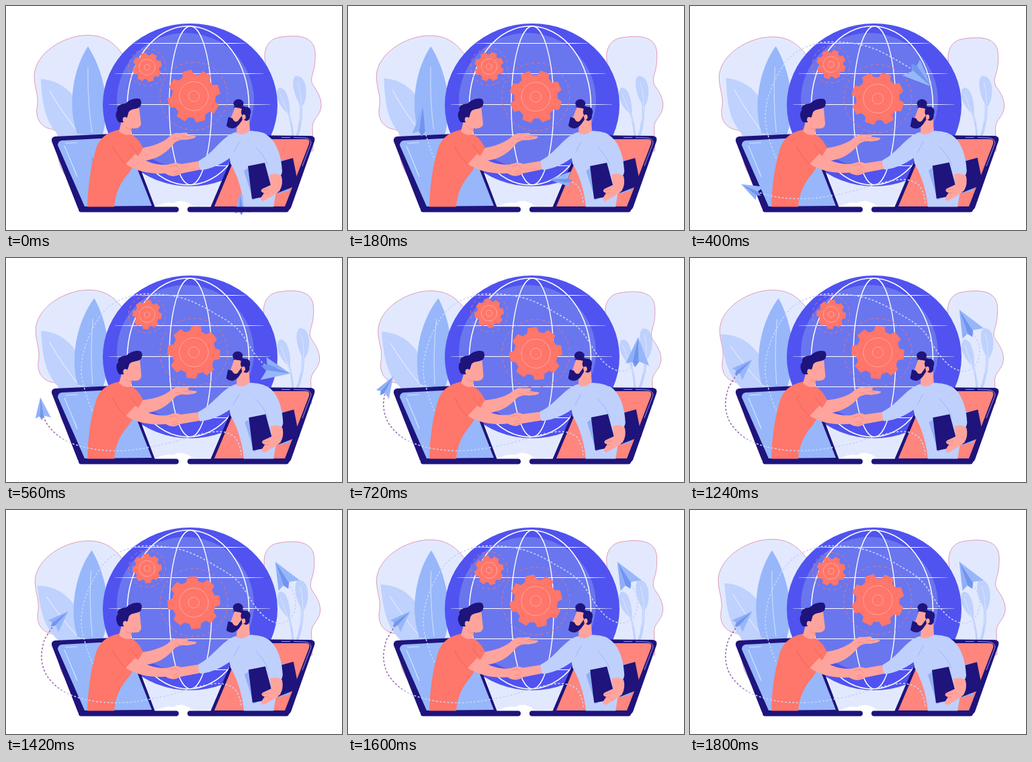
Animation, 500 px wide and 333 px high, one loop 1820 ms. Source, as an HTML page with a canvas:

```html
<!DOCTYPE html>
<html lang="en">
<head>
<meta charset="utf-8">
<title>Online agreement</title>
<style>
html, body { margin: 0; width: 100%; height: 100%; overflow: hidden; background: #fff; }
canvas { display: block; width: 500px; height: 333px; }
</style>
</head>
<body>
<canvas id="stage" width="500" height="333"></canvas>
<script>
const ctx = document.getElementById('stage').getContext('2d');
const LOOP = 1820, TAU = Math.PI * 2, DEG = Math.PI / 180;
const C = {
  navy: '#1e147c', coral: '#ff766a', crease: '#e9635d', skin: '#ffa49d', skinLine: '#f0837c',
  screen: '#97b7fa', warm: '#ff857d', shirt: '#bfd0fc', fold: '#91aff5', mist: '#e2e9fe',
  leaf: '#97b7fa', pale: '#bfd1fd', globe: '#5053ef', glow: '#6a76ee', trail: '#c5d3fc'
};

function fill(d, color) {
  ctx.fillStyle = color;
  ctx.fill(new Path2D(d));
}
function line(d, color, width = 1) {
  ctx.strokeStyle = color;
  ctx.lineWidth = width;
  ctx.stroke(new Path2D(d));
}
function oval(x, y, rx, ry, color) {
  ctx.beginPath();
  ctx.ellipse(x, y, rx, ry, 0, 0, TAU);
  ctx.fillStyle = color;
  ctx.fill();
}
function ring(x, y, rx, ry, color, width) {
  ctx.beginPath();
  ctx.ellipse(x, y, rx, ry, 0, 0, TAU);
  ctx.strokeStyle = color;
  ctx.lineWidth = width;
  ctx.stroke();
}
function turned(x, y, degrees, draw) {
  ctx.save();
  ctx.translate(x, y);
  ctx.rotate(degrees * DEG);
  ctx.translate(-x, -y);
  draw();
  ctx.restore();
}

// Smooth curve through a few points, sampled with its running length
function route(points) {
  const out = [];
  const at = i => points[Math.max(0, Math.min(points.length - 1, i))];
  let length = 0;
  for (let i = 0; i < points.length - 1; i++) {
    const [a, b, c, d] = [at(i - 1), at(i), at(i + 1), at(i + 2)];
    for (let k = i ? 1 : 0; k <= 16; k++) {
      const t = k / 16;
      const [x, y] = [0, 1].map(n => 0.5 * (2 * b[n] + (c[n] - a[n]) * t +
        (2 * a[n] - 5 * b[n] + 4 * c[n] - d[n]) * t * t +
        (3 * b[n] - a[n] - 3 * c[n] + d[n]) * t * t * t));
      const last = out[out.length - 1];
      if (last) length += Math.hypot(x - last.x, y - last.y);
      out.push({ x, y, length });
    }
  }
  return { points: out, length };
}
function along(path, dist) {
  const p = path.points;
  let i = 1;
  while (i < p.length - 1 && p[i].length < dist) i++;
  const a = p[i - 1], b = p[i], f = (dist - a.length) / (b.length - a.length || 1);
  return { x: a.x + (b.x - a.x) * f, y: a.y + (b.y - a.y) * f, angle: Math.atan2(b.y - a.y, b.x - a.x) };
}

const lowRoute = route([[350, 293], [348, 281], [339, 265], [318, 258], [285, 263], [235, 277], [180, 286],
  [130, 284], [88, 271], [62, 248], [53, 222], [56, 197], [62, 185], [70, 173], [81, 162]]);
const highRoute = route([[135, 242], [120, 205], [112, 165], [122, 120], [149, 76], [188, 56], [230, 54],
  [270, 62], [310, 82], [345, 106], [372, 145], [391, 163], [411, 168], [427, 156], [431, 136], [427, 121], [419, 109], [411, 95]]);

// Flight progress: time, share of route, slope per ms
const flight = [[0, 0, 0], [180, .13, .0019], [400, .68, .0013], [720, .915, .0004], [1040, .99, .0001], [1300, 1, 0]];
function progress(t) {
  for (let i = 1; i < flight.length; i++) {
    const [t0, p0, m0] = flight[i - 1], [t1, p1, m1] = flight[i];
    if (t > t1) continue;
    const w = t1 - t0, u = (t - t0) / w, v = 1 - u;
    return v * v * (1 + 2 * u) * p0 + u * v * v * w * m0 + u * u * (3 - 2 * u) * p1 - u * u * v * w * m1;
  }
  return 1;
}

function plane(path, t, sx, sy, color) {
  const dist = progress(t) * path.length, pos = along(path, dist);
  ctx.beginPath();
  for (const p of path.points) {
    if (p.length > dist - 12) break;
    ctx.lineTo(p.x, p.y);
  }
  ctx.strokeStyle = color;
  ctx.lineWidth = 1.6;
  ctx.setLineDash([3, 2.6]);
  ctx.stroke();
  ctx.setLineDash([]);
  ctx.save();
  ctx.translate(pos.x, pos.y);
  ctx.rotate(pos.angle);
  ctx.scale(sx, sy);
  fill('M21 0L-16 -7L-24 -3L-14 4Z', '#7195ee');
  fill('M21 0L-19 -17L-16 -7Z', '#8eaff8');
  fill('M21 0L-15 2L-21 18Z', '#98b7fa');
  ctx.restore();
}

function gear(x, y, r, turn) {
  ctx.setLineDash([4.5, 4]);
  ctx.lineDashOffset = -turn * r * 1.3;
  ring(x, y, r * 1.31, r * 1.31, '#e7757f', 1);
  ctx.setLineDash([]);
  ctx.save();
  ctx.translate(x, y);
  ctx.rotate(turn);
  ctx.beginPath();
  for (let i = 0; i < 8; i++) {
    for (const [a, k] of [[-.25, .82], [-.16, 1], [.16, 1], [.25, .82]]) {
      const q = i * TAU / 8 + a;
      ctx.lineTo(Math.sin(q) * r * k, -Math.cos(q) * r * k);
    }
  }
  ctx.closePath();
  ctx.fillStyle = ctx.strokeStyle = C.coral;
  ctx.lineWidth = 2;
  ctx.lineJoin = 'round';
  ctx.fill();
  ctx.stroke();
  ctx.restore();
  ring(x, y, r * .56, r * .56, '#ffaca4', .9);
  ring(x, y, r * .21, r * .21, '#ffaca4', .9);
}

function clouds(s) {
  ctx.save();
  ctx.translate(235, 300);
  ctx.scale(1 - .016 * s, 1 - .023 * s);
  ctx.translate(-235, -300);
  for (const d of [
    'M180 82C163 53 145 43 120 43.5C86 44 43 70 42 104C42 122 50 134 46 152C44 170 54 181 68 183C82 186 76 200 77 217C78 240 88 258 112 272L200 250Z',
    'M386 84C382 65 390 50 405 47C420 44 440 43 450 50C461 57 461 70 459.5 86C458 101 451 108 457 118C465 129 470 139 469 150C467 164 456 168 456 180L457 215L390 230L380 120Z'
  ]) {
    fill(d, C.mist);
    line(d, '#df8fb0', .9);
  }
  fill('M200 230L340 230L325 300C305 293 292 300 278 297C267 288 256 288 249 293C238 290 228 296 218 299Z', C.mist);
  ctx.restore();
}

function leaves(t, s) {
  turned(115, 195, 2.8 * Math.cos((t - 300) / LOOP * TAU) - 1, () => {
    fill('M51 109C90 111 115 141 124 196L84 198C58 175 54 150 51 109Z', C.pale);
    line('M64 126Q84 160 110 191', '#e2eaff', 1.2);
  });
  turned(130, 200, 5.7 * s, () => {
    fill('M122 60C101 91 90 146 106 190L143 194C157 148 145 96 122 60Z', C.leaf);
    line('M122 91Q121 142 128 188', '#c8d8fe', 1.3);
  });
  turned(428, 198, 1.2 * s, () => {
    line('M413 145Q426 166 427 198', C.pale, 3);
    fill('M406 122C398 130 406 151 422 162C424 147 418 118 406 122Z', C.pale);
    line('M408 131L424 172', '#dce6ff', .9);
  });
  turned(430, 198, 5.5 * s, () => {
    line('M438 138Q442 168 432 198', C.pale, 4);
    fill('M431 104C423 110 428 134 440 150C450 140 450 102 431 104Z', C.pale);
    line('M434 113Q443 138 437 172', '#dce6ff', .9);
  });
}

function globe() {
  oval(274, 147, 130, 121, C.globe);
  oval(267, 140, 102, 100, C.glow);
  ring(271, 148, 90.5, 118, '#fff', 1.5);
  ring(274.5, 148, 31.5, 118, '#fff', 1.4);
  for (const [y, a, b] of [[55.5, 190, 357], [100.5, 162, 383], [146.5, 153, 393], [191.5, 163, 383], [237.5, 190, 357]]) {
    const g = ctx.createLinearGradient(a, 0, b, 0);
    g.addColorStop(0, '#ffffff55');
    g.addColorStop(.12, '#fff');
    g.addColorStop(.88, '#fff');
    g.addColorStop(1, '#ffffff55');
    line(`M${a} ${y}H${b}`, g, 1.2);
  }
}

function leftScreen() {
  fill('M73 194L180 189L222 300L112 305Q108 304 106 298L68 201Q67 195 73 194Z', C.navy);
  fill('M83 200L177 195L217 297L117 298L77 207Q77 201 83 200Z', C.screen);
  line('M88 204L106 203M87 208L105 251M101 242L106 254', '#d4e1ff', 1.2);
}
function rightScreen() {
  fill('M350 192L454 193Q461 194 459 201L424 300Q421 305 416 305L304 300Z', C.navy);
  fill('M352 198L446 198Q453 198 451 205L415 298L310 298Z', C.warm);
  line('M410 195.5L423 195.5M428 195.5L444 196Q454 197 454 204L441 238', '#a79de0', .9);
}
function base(x0, x1) {
  ctx.beginPath();
  ctx.roundRect(x0, 298.5, x1 - x0, 8, 4);
  ctx.fillStyle = C.navy;
  ctx.fill();
}

function leftMan(s) {
  turned(197, 222, 5 * s, () => {
    fill('M188 212C210 212 229 205 240 197C247 190 251 188 258 189L269 188Q272 190 268 192L282 193Q284 195 278 197L268 199C260 198 256 200 251 203C242 215 230 225 212 229L190 233Z', C.skin);
    line('M262 194L275 194.5M250 197Q255 196 260 198', C.skinLine, .7);
  });
  fill('M168 184C151 187 139 196 134 212C125 241 122 270 121 300L161 300C162 281 168 267 178 254Q187 244 190 235L204 211C199 201 194 195 187 191Z', C.coral);
  turned(180, 228, -3 * s, () => {
    fill('M191 219C206 231 222 237 240 236L252 233Q263 235 262 243Q259 249 250 253Q243 253 237 249C214 250 194 246 177 234Z', C.skin);
  });
  fill('M160 205C165 193 187 195 204 211L193 219L178 235Q166 225 160 205Z', C.coral);
  line('M159 208Q165 224 178 235M186 206Q190 214 195 218', C.crease, .9);
  turned(178, 190, 2.5 * s, () => {
    fill('M172 171L168 186Q176 194 186 191L187 179Z', C.skin);
    fill('M174 168C177 155 188 150 198 150L201 175Q200 183 188 182C180 181 176 176 174 168Z', C.skin);
    line('M178 180Q182 184 187 183', C.skinLine, .8);
    fill('M168 173C163 167 162 159 166 155C163 149 172 145 178 145C183 139 193 136 199 138Q203 142 200 149C196 154 187 152 183 157C181 160 182 164 179 167Q172 164 175 173Z', C.navy);
    oval(177, 169, 3.3, 4, C.skin);
  });
}

function rightMan(s) {
  fill('M335 191C345 184 373 184 386 190C400 201 410 220 411 246Q411 260 403 270L398 300L354 300C353 278 344 250 334 234L330 208Z', C.shirt);
  line('M371 209Q384 222 390 237M347 202L336 222', C.fold, .8);
  turned(335, 207, 2.5 * s, () => {
    fill('M290 230L261 235Q251 231 244 237Q239 241 246 245L247 251Q251 255 261 249L290 243Z', C.skin);
    line('M244 239L253 237L259 243M248 247L256 245M249 251L258 248', C.skinLine, .8);
    fill('M341 188C322 193 309 219 287 230Q286 238 290 244C308 242 325 233 338 222Z', C.shirt);
  });
  turned(352, 188, -2.5 * s, () => {
    fill('M344 174L343 189Q353 194 363 185L362 167L351 168Z', C.skin);
    fill('M341 150L354 152L353 168L346 178L334 168Z', C.skin);
    oval(346, 145, 7.5, 6.5, C.navy);
    fill('M338 151C342 147 351 147 356 150C364 149 366 157 363 162C364 169 358 174 353 168L353 164Q348 160 351 153Q345 150 338 151Z', C.navy);
    fill('M331 165L337 167Q340 174 345 171L351 163Q354 168 349 173Q345 180 338 182Q331 182 328 178Z', C.navy);
    oval(354, 165, 2.7, 3.8, C.skin);
  });
  ctx.save();
  ctx.translate(2 * s, -s);
  fill('M354 245L363 239L378 282L368 289Z', C.fold);
  fill('M407 232L412 228L421 275L402 279Z', C.fold);
  fill('M360 238L385 233L398 281L366 287Z', C.navy);
  fill('M409 231L427 226L435 266L404 278Z', C.navy);
  fill('M386 191C401 198 410 220 411 246Q410 255 402 257L391 250Q391 231 382 215Z', C.shirt);
  fill('M392 251Q402 247 410 253Q413 265 407 275L394 284L383 290Q377 289 380 284L384 278Q377 276 381 272L394 266Z', C.skin);
  line('M381 274L391 273M383 279L390 278', C.skinLine, .8);
  ctx.restore();
}

function draw(t) {
  const s = (1 - Math.cos(t / LOOP * TAU)) / 2;
  const spin = t / LOOP * TAU - .27;
  ctx.fillStyle = '#fff';
  ctx.fillRect(0, 0, 500, 333);
  clouds(s);
  leaves(t, s);
  globe();
  gear(210, 91 - 10 * s, 21, spin);
  gear(279.5, 134 + 9 * s, 38.5, spin);
  leftScreen();
  plane(highRoute, t, 1, 1, C.trail);
  leftMan(s);
  rightScreen();
  const tint = ctx.createLinearGradient(74, 0, 92, 0);
  tint.addColorStop(0, '#9a6bb4');
  tint.addColorStop(1, C.trail);
  plane(lowRoute, t, .76, .66, tint);
  rightMan(s);
  base(108, 257);
  base(270, 421);
}

const start = performance.now();
function tick() {
  draw((performance.now() - start) % LOOP);
  requestAnimationFrame(tick);
}
tick();
</script>
</body>
</html>
```
